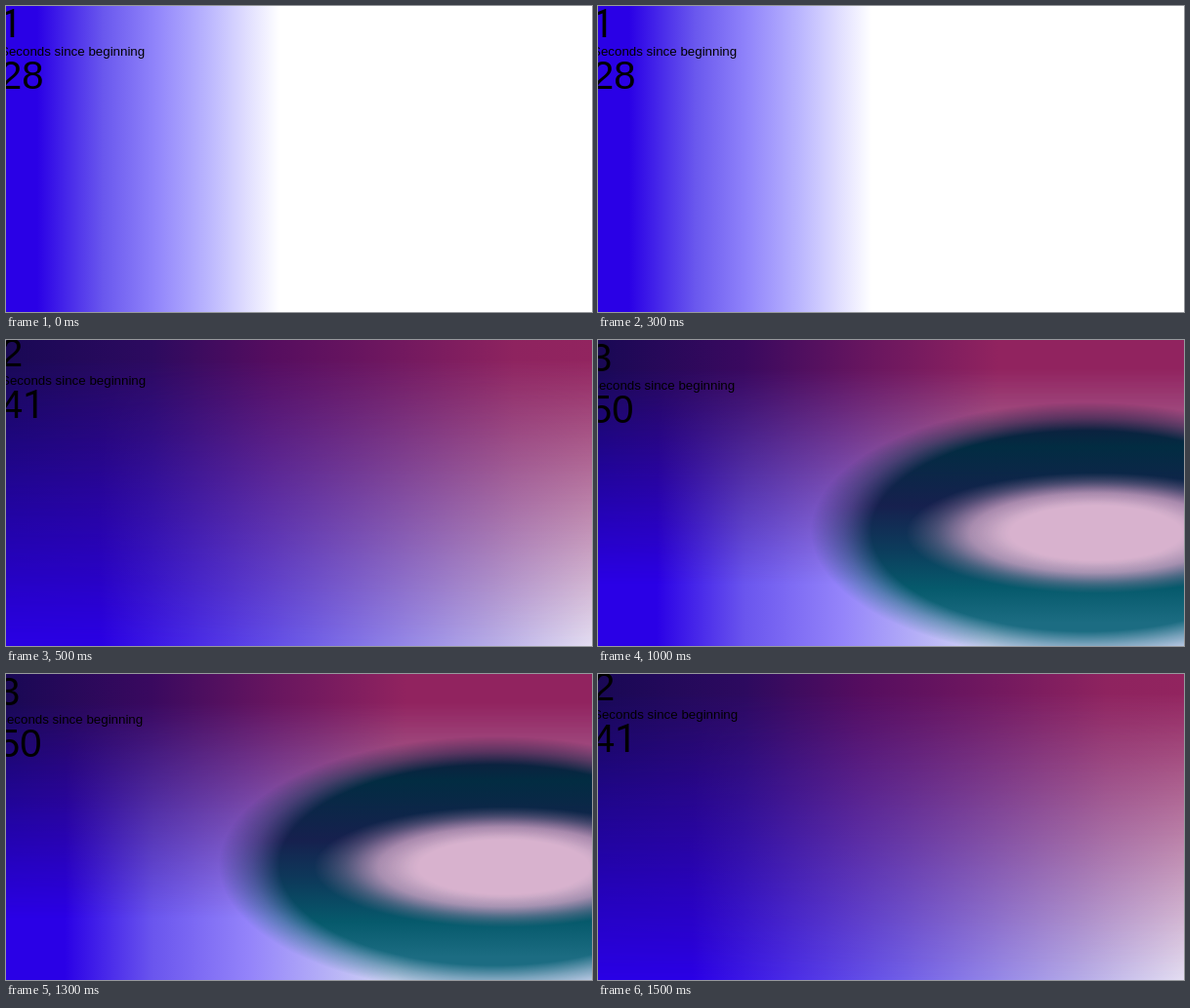
These frames come from a looping animation (600 px wide and 314 px high, 2000 ms). An HTML page:

```html
<!DOCTYPE html>
<html lang="en">
<head>
<meta charset="utf-8">
<title>Seconds counter</title>
<style>
  html, body { margin: 0; width: 100%; height: 100%; overflow: hidden; background: #fff; }
  .scene, .scene i { position: absolute; inset: 0; overflow: hidden; }
  .scene { visibility: hidden; }
  .scene.on { visibility: visible; }
  .scene i { -webkit-mask-image: var(--fade); mask-image: var(--fade); }

  #blue { background: linear-gradient(90deg, #2a00e6 32px, #6a58ee 100px, #9286fb 155px, #b9b4fe 205px, #fff 280px); }
  #dusk { background: linear-gradient(90deg, #2a00e6 95px, #6c5ae8 300px, #b8aee8 500px, #e4def2 600px); }
  #ring { background: linear-gradient(90deg, #2a00e6 60px, #6a55ee 150px, #9484fa 250px, #d4d8f4 400px); }

  #dusk .shade {
    --fade: linear-gradient(#000 20px, transparent 314px);
    background: linear-gradient(90deg, #190855, #2d0a5f 150px, #550d5f 270px, #6c165f 380px, #8e235f 520px, #92245f);
  }
  #ring .shade {
    --fade: linear-gradient(#000 30px, transparent 250px);
    background: linear-gradient(90deg, #190855, #3a095f 150px, #66155f 270px, #91235f 410px);
  }
  .outer {
    --fade: radial-gradient(282px 132px at 500px 196px, #000 78%, rgba(0,0,0,.5) 88%, transparent);
    background: linear-gradient(#14183c 75px, #022c42 110px, #16204e 170px, #0c3c5c 215px, #065a6c 255px, #1c6c82 290px);
  }
  .inner {
    --fade: radial-gradient(195px 62px at 510px 198px, #000 45%, rgba(0,0,0,.8) 66%, rgba(0,0,0,.35) 84%, transparent);
    background: radial-gradient(195px 62px at 510px 198px, #d8b2ce 50%, #c89cc0 75%, #94809e);
  }
  text { font-family: "Liberation Sans", Arial, sans-serif; font-size: 13.33px; }
  .big { font-size: 40px; }
  .one { font-family: Roboto, sans-serif; }
</style>
</head>
<body>
<div class="scene" id="blue"></div>
<div class="scene" id="dusk"><i class="shade"></i></div>
<div class="scene" id="ring"><i class="shade"></i><i class="outer"></i><i class="inner"></i></div>
<script>
  const STEP = 500;
  const scenes = [
    { id: "blue", count: 1, seconds: 28, x: -6, y: 0 },
    { id: "dusk", count: 2, seconds: 41, x: -5, y: -5 },
    { id: "ring", count: 3, seconds: 50, x: -8, y: 0 },
  ];
  const order = [0, 1, 2, 1];

  // The digit 1 takes a face without a foot serif.
  const big = (n, y) => `<text class="big" y="${y}">` +
    String(n).replace("1", '<tspan class="one">1</tspan>') + "</text>";

  for (const s of scenes) {
    s.el = document.getElementById(s.id);
    s.el.insertAdjacentHTML("beforeend",
      `<svg width="600" height="314" style="position:absolute;left:0;top:0">
        <g transform="translate(${s.x} ${s.y})">
          ${big(s.count, 32)}
          <text y="51">Seconds since beginning</text>
          ${big(s.seconds, 85)}
        </g>
      </svg>`);
  }

  function draw() {
    const current = order[Math.floor(performance.now() / STEP) % order.length];
    scenes.forEach((s, i) => s.el.classList.toggle("on", i === current));
    requestAnimationFrame(draw);
  }
  draw();
</script>
</body>
</html>
```
